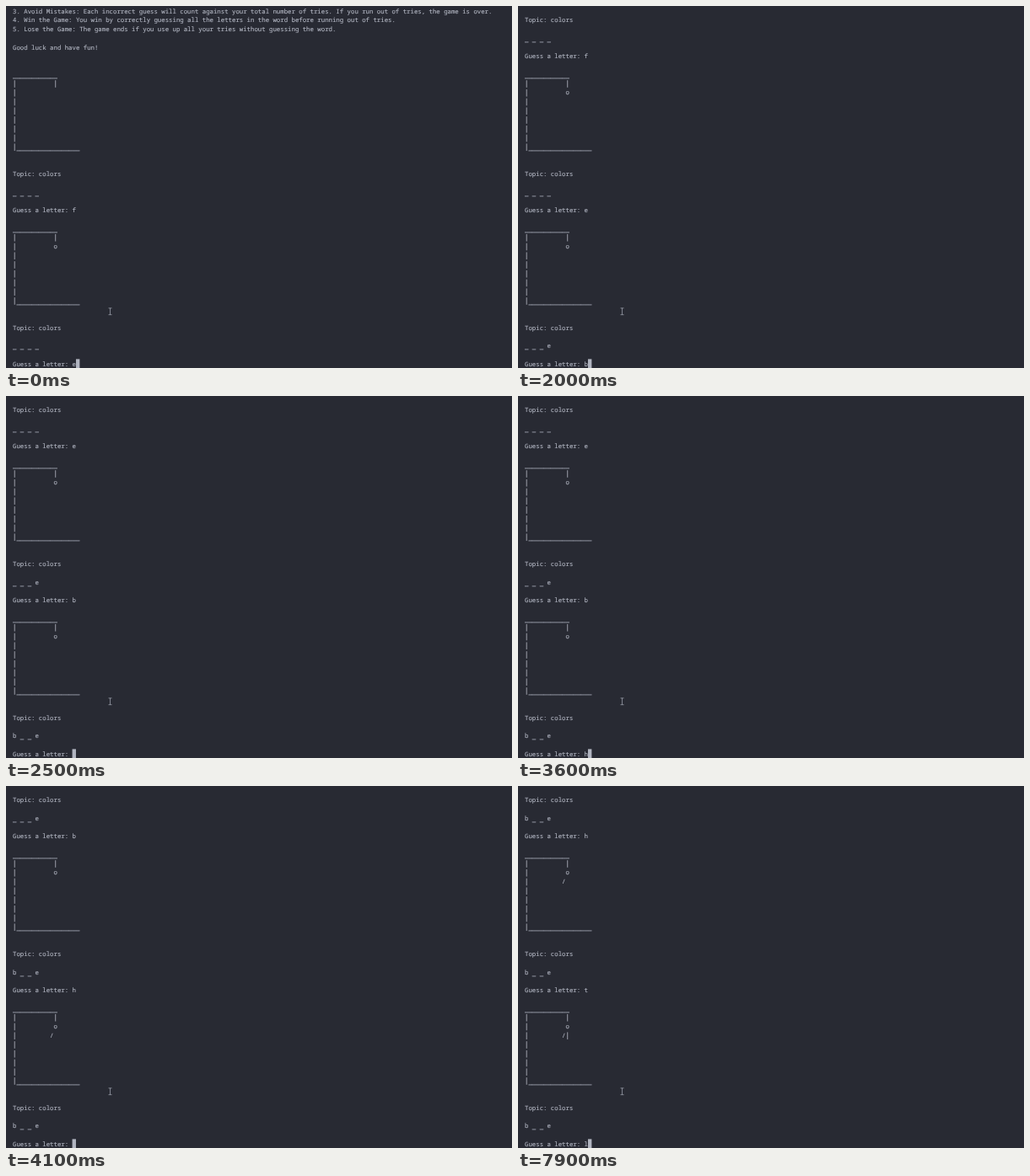
Write an HTML page that moves like this. It is 600 px wide and 430 px high and loops after 8 s.

```html
<!DOCTYPE html>
<html lang="en">
<head>
<meta charset="utf-8">
<title>Hangman in a terminal</title>
<style>
  html, body { margin: 0; width: 100%; height: 100%; overflow: hidden; background: #282a33; }
  svg { display: block; }
  text {
    font: 7.35px "Noto Sans Mono", "DejaVu Sans Mono", monospace;
    font-variant-ligatures: none;
    text-rendering: geometricPrecision;
    white-space: pre;
    fill: #b1b5c1;
    stroke: #b1b5c1;
    stroke-width: .12px;
  }
  path { fill: none; stroke: #b1b5c1; stroke-width: .85px; }
  #mouse { stroke-width: .65px; }
</style>
</head>
<body>
<svg width="600" height="430" viewBox="0 0 600 430">
  <g id="screen"></g>
  <rect id="cursor" y="419.4" width="4.4" height="10.6" fill="#b1b5c1"/>
  <path id="mouse" d="M121.5 358.9H125.5M123.5 358.9V366.7M121.5 366.7H125.5"/>
</svg>
<script>
const LOOP = 8000, LEFT = 8, BASE = 8.6, CELL = 4.41, ROW = 10.75, BLOCK = 17;

const intro = [
  "3. Avoid Mistakes: Each incorrect guess will count against your total number of tries. If you run out of tries, the game is over.",
  "4. Win the Game: You win by correctly guessing all the letters in the word before running out of tries.",
  "5. Lose the Game: The game ends if you use up all your tries without guessing the word.",
  "", "Good luck and have fun!", "", ""
];

// word shown, letter guessed, body parts drawn, time of typing, time of Enter
const rounds = [
  ["_ _ _ _", "f", 0, -1, -1],
  ["_ _ _ _", "e", 1, -1, 400],
  ["_ _ _ e", "b", 1, 1500, 2200],
  ["b _ _ e", "h", 1, 2900, 3800],
  ["b _ _ e", "t", 2, 5100, 5600],
  ["b _ _ e", "l", 3, 7600, LOOP]
];

const post = (part = "") => "|" + " ".repeat(part ? 9 : 0) + part;
const blockLines = ([word, , parts]) => [
  "_".repeat(12),
  post(" |"),
  post(parts > 0 ? " o" : ""),
  post(["", "", "/", "/|"][parts]),
  ...Array(4).fill(post()),
  "|" + "_".repeat(17),
  "", "", "Topic: colors", "", word, "", "Guess a letter: ", ""
];

const screen = document.getElementById("screen");
const cursor = document.getElementById("cursor");

function add(tag, attrs) {
  const el = document.createElementNS("http://www.w3.org/2000/svg", tag);
  for (const name in attrs) el.setAttribute(name, attrs[name]);
  screen.append(el);
  return el;
}

function addText(str, x, y) {
  if (!str.trim()) return;
  const el = add("text", { x, y });
  el.textContent = str;
  return el;
}

// Underscores sit a little lower than the rest; bars fill most of the line height.
function addLine(str, row) {
  const y = BASE + row * ROW;
  addText(str.replace(/[_|]/g, " "), LEFT, y);
  addText(str.replace(/[^_]/g, " "), LEFT, y + 0.9);
  for (const bar of str.matchAll(/\|/g)) {
    add("path", { d: `M${LEFT + (bar.index + 0.5) * CELL} ${y - 6.4}v8.6` });
  }
}

intro.forEach(addLine);
const letters = rounds.map((round, i) => {
  const top = intro.length + i * BLOCK;
  blockLines(round).forEach((line, j) => addLine(line, top + j));
  return addText(round[1], LEFT + 16 * CELL, BASE + (top + 15) * ROW);
});

function draw() {
  const t = performance.now() % LOOP;
  const now = rounds.findIndex(r => t < r[4]);
  const typed = t >= rounds[now][3];
  screen.setAttribute("transform", `translate(0 ${-(now - 1) * BLOCK * ROW})`);
  letters.forEach((el, i) => {
    el.style.visibility = i < now || (i === now && typed) ? "visible" : "hidden";
  });
  cursor.setAttribute("x", LEFT + (typed ? 17 : 16) * CELL);
  requestAnimationFrame(draw);
}
draw();
</script>
</body>
</html>
```
